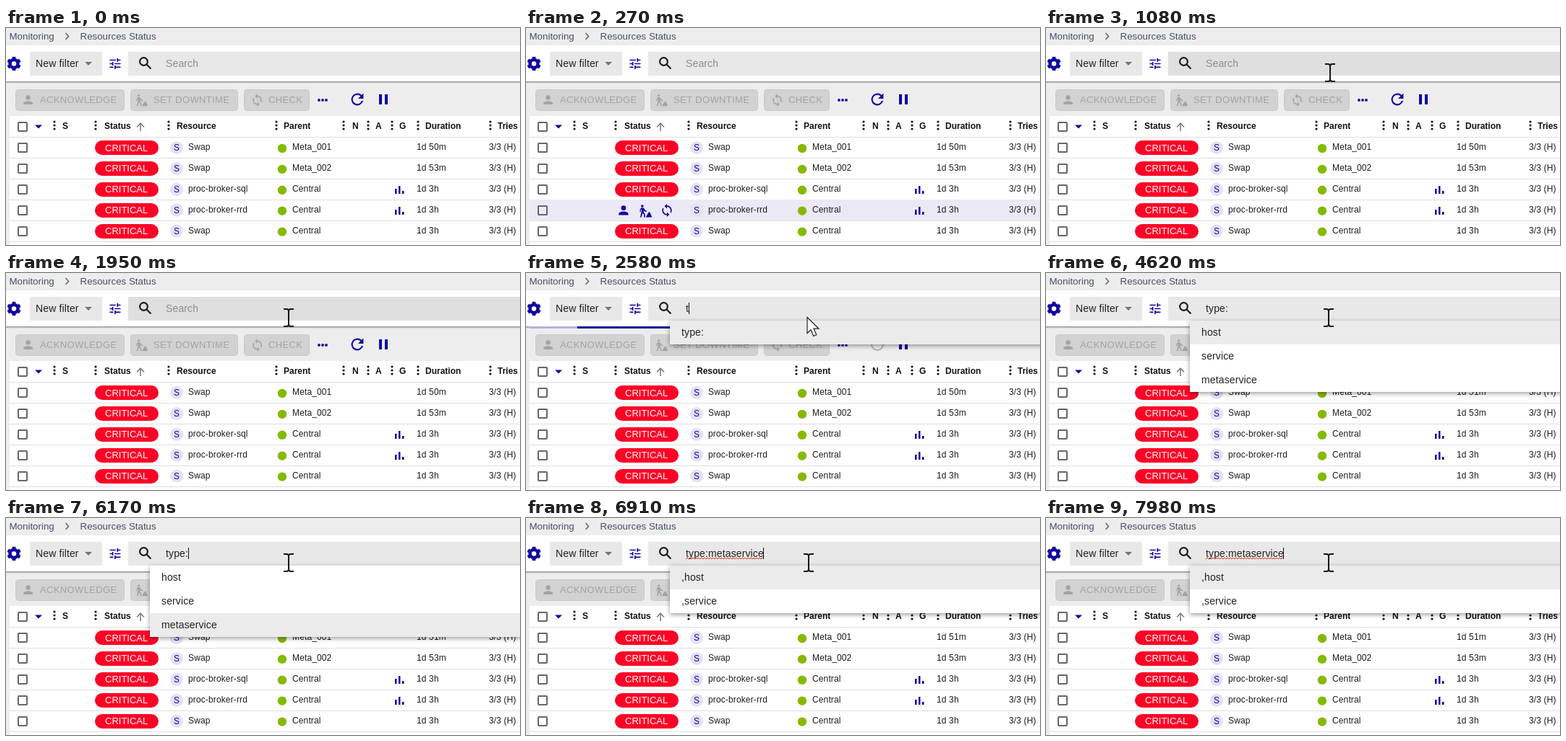
Recreate the animation shown at these times as an HTML page. Size 711 by 301 pixels, loop 8000 ms.

```html
<!DOCTYPE html>
<html lang="en">
<head>
<meta charset="utf-8">
<title>Resources Status</title>
<style>
  html, body { margin: 0; width: 100%; height: 100%; overflow: hidden; background: #fff; }
  svg { display: block; width: 711px; height: 301px; font: 12px "Liberation Sans", Arial, sans-serif; }
  text { white-space: pre; fill: #1b1b1b; }
  .crumb { font-size: 13.33px; fill: #42506b; }
  .field { font-size: 14px; letter-spacing: .13px; fill: #222; }
  .hint { fill: #8d8d8d; }
  .button { font-size: 13px; letter-spacing: .37px; fill: #a3a3a3; }
  .head { font-weight: bold; fill: #111; }
  .cell { letter-spacing: .13px; }
  .chip { font-size: 13px; fill: #fff; }
  .navy { fill: #10069f; }
  .grey { fill: #a3a3a3; }
  .caret { fill: #111; }
  .paper { filter: drop-shadow(0 2px 3px rgba(0, 0, 0, .4)); }
</style>
</head>
<body>
<svg viewBox="0 0 711 301">
  <defs>
    <path id="person" d="M12 12a4 4 0 1 0 0-8a4 4 0 0 0 0 8zm0 2c-2.67 0-8 1.34-8 4v2h16v-2c0-2.66-5.33-4-8-4z"/>
    <path id="sync" d="M12 4V1L8 5l4 4V6c3.31 0 6 2.69 6 6 0 1-.25 1.97-.7 2.8l1.46 1.46A8 8 0 0 0 12 4zm0 14c-3.31 0-6-2.69-6-6 0-1 .25-1.97.7-2.8L5.24 7.74A8 8 0 0 0 12 20v3l4-4-4-4z"/>
    <path id="refresh" d="M17.65 6.35A8 8 0 1 0 19.73 14h-2.08A6 6 0 1 1 16.22 7.78L13 11h7V4z"/>
    <path id="tune" d="M3 17v2h6v-2zM3 5v2h10V5zm10 16v-2h8v-2h-8v-2h-2v6zM7 9v2H3v2h4v2h2V9zm14 4v-2H11v2zm-6-4h2V7h4V5h-4V3h-2z"/>
    <path id="worker" d="M6 1.5a2.2 2.2 0 1 0 .1 0zM4 7l4-.5 4 5 2 .8-.5 1.6-3-.8-1.5-1.6-.6 3 2.6 3V23H9v-4.5l-2.5-2.6L4.6 23H2.4L5 12V9.500L3.500 11v3H2V10zM12 23l5-8.500 2-.5 4 9z"/>
    <linearGradient id="edge" x2="0" y2="1">
      <stop stop-color="#8c8c8c"/><stop offset="1" stop-color="#ededed"/>
    </linearGradient>
  </defs>

  <path fill="#ededed" d="M0 0H711V24H0zM0 75H711V301H0z"/>
  <text class="crumb" x="4.500" y="16">Monitoring</text>
  <path d="M54 0" fill="none"/>
  <path d="M82.500 7l4 4.500-4 4.500" fill="none" stroke="#5c6679" stroke-width="1.500"/>
  <text class="crumb" x="102.500" y="16">Resources Status</text>

  <g fill="none" stroke="#10069f">
    <circle cx="11" cy="49.500" r="5.500" stroke-width="4.500"/>
    <circle cx="11" cy="49.500" r="8" stroke-width="3.400" pathLength="60" stroke-dasharray="5.500 4.500" stroke-dashoffset="-2.250"/>
  </g>
  <path fill="#e8e8e8" d="M33 33H133V66H33zM169 33H711V66H169z"/>
  <path fill="#dfdfdf" d="M169 33H711V66H169z" data-on="410-2220"/>
  <text class="field" x="41" y="54">New filter</text>
  <path fill="#757575" d="M109 47h10l-5 5z"/>
  <use href="#tune" class="navy" transform="translate(141 39.500) scale(.83)"/>
  <g fill="none" stroke="#1c1c1c" stroke-width="2.200">
    <circle cx="190.500" cy="46.500" r="5.400"/><path d="M194.500 50.500l6 6"/>
  </g>
  <rect y="74" width="711" height="3" fill="url(#edge)"/>
  <g data-on="2360-2770">
    <rect x="5" y="74" width="706" height="3" fill="#b4b1df"/>
    <rect id="bar" y="74" width="711" height="3" class="navy"/>
  </g>

  <g fill="#d2d2d2" stroke="#c9c9c9">
    <rect x="13.500" y="85.500" width="150" height="29" rx="4"/>
    <rect x="172.500" y="85.500" width="148" height="29" rx="4"/>
    <rect x="329.500" y="85.500" width="90" height="29" rx="4"/>
  </g>
  <g class="grey">
    <use href="#person" transform="translate(21 90) scale(.8)"/>
    <use href="#worker" transform="translate(179 91) scale(.75)"/>
    <use href="#sync" transform="translate(338 90.500) scale(.8)"/>
  </g>
  <text class="button" x="47" y="104">ACKNOWLEDGE</text>
  <text class="button" x="204" y="104">SET DOWNTIME</text>
  <text class="button" x="363" y="104">CHECK</text>
  <g class="navy">
    <circle cx="433" cy="100" r="1.900"/><circle cx="438" cy="100" r="1.900"/><circle cx="443" cy="100" r="1.900"/>
    <use href="#refresh" transform="translate(473.400 86.400) scale(1.050)" data-on="0-2360 2770-8000"/>
    <path d="M516 92h4v14h-4zM524 92h4v14h-4z"/>
  </g>
  <circle cx="486" cy="99" r="8" fill="none" stroke="#b0b0b0" stroke-width="2" data-on="2360-2770"/>

  <rect x="5" y="122" width="706" height="179" fill="#fff"/>
  <g id="table"></g>

  <text class="field hint" x="221" y="54" data-on="0-2220">Search</text>
  <text class="field" x="221" y="54" data-on="2220-4110">t</text>
  <text class="field" x="221" y="54" data-on="4110-6700">type:</text>
  <g data-on="6700-8000">
    <text class="field" x="221" y="54">type:metaservice</text>
    <path id="squiggle" fill="none" stroke="#e0301e"/>
  </g>
  <g id="menus"></g>
  <g id="carets"></g>

  <g id="beam" data-on="870-2290 2660-8000">
    <path d="M-7-12h4q3 0 3 3q0-3 3-3h4M0-9V9M-7 12h4q3 0 3-3q0 3 3 3h4" fill="none" stroke="#151515" stroke-width="2"/>
  </g>
  <path d="M389 61.500v22l5-4.800 3.800 8.800 4-1.700-3.800-8.600h7z" fill="#fff" stroke="#222" stroke-width="1.200" data-on="2290-2660"/>
</svg>
<script>
  const LOOP = 8000;
  const $ = id => document.getElementById(id);
  const text = (x, y, str, cls = 'cell', on) =>
    `<text class="${cls}" x="${x}" y="${y}"${on ? ` data-on="${on}"` : ''}>${str}</text>`;
  const icon = (id, x, y, s) => `<use href="#${id}" class="navy" transform="translate(${x} ${y}) scale(${s})"/>`;
  const box = y => `<rect x="17" y="${y - 6}" width="12" height="12" rx="1" fill="none" stroke="#666" stroke-width="2"/>`;

  const columns = [[67, 78, 'S'], [124, 136, 'Status'], [225, 236, 'Resource'], [374, 384, 'Parent'],
    [467, 479, 'N'], [501, 511, 'A'], [534, 544, 'G'], [570, 580, 'Duration'], [670, 680, 'Tries']];
  const rows = [['Swap', 'Meta_001', '1d 50m'], ['Swap', 'Meta_002', '1d 53m'],
    ['proc-broker-sql', 'Central', '1d 3h', true], ['proc-broker-rrd', 'Central', '1d 3h', true],
    ['Swap', 'Central', '1d 3h']];

  function header() {
    const dots = x => [130, 135, 140].map(y => `<circle cx="${x}" cy="${y}" r="1.6" fill="#111"/>`).join('');
    return box(137) + '<path class="navy" d="M40 134.500h10l-5 5z"/>' +
      '<path d="M186 143v-11m-5 5.500l5-5.500 5 5.500" fill="none" stroke="#777" stroke-width="1.500"/>' +
      columns.map(([d, x, label]) => dots(d) + text(x, 140, label, 'head')).join('');
  }

  function row([name, parent, age, graph], i) {
    const y = 166 + i * 28.9, base = Math.round(y + 3), hovered = i === 3;
    const ageCell = i ? text(568, base, age)
      : text(568, base, age, 'cell', '0-2700') + text(568, base, '1d 51m', 'cell', '2700-8000');
    return (hovered ? `<rect x="5" y="238" width="706" height="29" fill="#ebe9f6" data-on="270-340"/>` : '') +
      `<rect x="5" y="${Math.round(y + 14)}" width="706" height="1" fill="#dedede"/>` + box(Math.round(y)) +
      `<g${hovered ? ' data-on="0-270 340-8000"' : ''}>
        <rect x="123" y="${Math.round(y - 10)}" width="88" height="20" rx="10" fill="#ff0026"/>
        ${text(137, Math.round(y + 4.5), 'CRITICAL', 'chip')}</g>` +
      (hovered ? `<g data-on="270-340">${icon('person', 125, 243, .83)}${icon('worker', 156, 244, .8)}${icon('sync', 185, 243, .83)}</g>` : '') +
      `<circle cx="236" cy="${y}" r="9" fill="#e3e1f3"/>` + text(232, Math.round(y + 4), 'S', 'navy') +
      text(252, base, name) + `<circle cx="382" cy="${y + 1}" r="6.2" fill="#84b900"/>` + text(396, base, parent) +
      (graph ? `<path class="navy" transform="translate(538 ${Math.round(y) + 6})" d="M0 0v-7h2.500V0zM5 0v-11h2.500V0zM10 0v-4h2.500V0z"/>` : '') +
      ageCell + text(668, base, '3/3 (H)');
  }

  // Each menu: items, visible span, and when each item is highlighted.
  const menus = [
    { on: '2290-4110', items: [['type:', '2290-4110']] },
    { on: '4110-6700', items: [['host', '4110-5480'], ['service', '5480-6020'], ['metaservice', '6020-6700']] },
    { on: '6700-8000', items: [[',host', '6700-8000'], [',service', '']] }
  ];
  const menu = ({ on, items }) => `<g data-on="${on}">
    <rect class="paper" x="199" y="66" width="520" height="${items.length * 33}" fill="#fff"/>
    ${items.map(([label, lit], i) =>
      (lit && `<rect x="199" y="${66 + i * 33}" width="512" height="33" fill="#ebebeb" data-on="${lit}"/>`) +
      text(215, 87 + i * 33, label, 'field')).join('')}</g>`;

  const carets = [[221, '1420-1950'], [225, '2220-2770 3300-3830'],
    [252, '4110-4620 5150-5690 6170-6700'], [328, '6700-7450 7980-8000']];

  $('table').innerHTML = '<rect x="5" y="296" width="706" height="5" fill="#ebe9f6" data-on="200-270"/>' +
    '<rect x="5" y="151" width="706" height="1" fill="#dedede"/>' + header() + rows.map(row).join('');
  $('menus').innerHTML = menus.map(menu).join('');
  $('carets').innerHTML = carets.map(([x, on]) =>
    `<rect class="caret" x="${x}" y="41" width="1" height="16" data-on="${on}"/>`).join('');
  $('squiggle').setAttribute('d', 'M221 57' + 'l2-2l2 2'.repeat(27));

  const timed = [...document.querySelectorAll('[data-on]')].map(el => ({
    el, spans: el.dataset.on.split(' ').map(s => s.split('-').map(Number))
  }));
  const path = [[870, 465, 12], [940, 440, 35], [1010, 410, 55], [1080, 393, 62], [1290, 390, 66], [1550, 391, 62]];

  function pointAt(t) {
    const i = path.findIndex(p => p[0] > t);
    if (i < 1) return (i ? path[path.length - 1] : path[0]).slice(1);
    const [t0, x0, y0] = path[i - 1], [t1, x1, y1] = path[i], k = (t - t0) / (t1 - t0);
    return [x0 + (x1 - x0) * k, y0 + (y1 - y0) * k];
  }

  function draw(now) {
    const t = now % LOOP;
    for (const { el, spans } of timed)
      el.style.display = spans.some(([a, b]) => t >= a && t < b) ? '' : 'none';
    $('beam').setAttribute('transform', `translate(${pointAt(t).map(Math.round)})`);
    $('bar').setAttribute('x', t < 2580 ? 5 : 70 + (t - 2580) * .9);
    requestAnimationFrame(draw);
  }
  draw(0);
</script>
</body>
</html>
```
